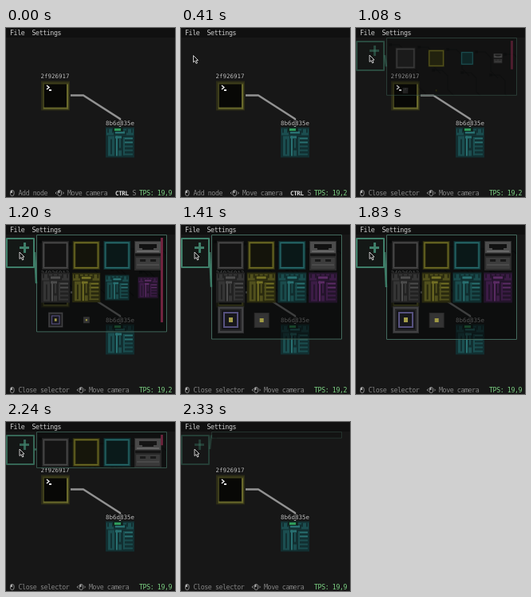
Animation, 212 px wide and 212 px high, one loop 2.41 s. Source, as an HTML page with a canvas:

```html
<!DOCTYPE html>
<html>
<head>
<meta charset="utf-8">
<style>
html, body { margin: 0; height: 100%; overflow: hidden; background: #171717; }
canvas { display: block; width: 100vw; height: 100vh; image-rendering: pixelated; }
</style>
</head>
<body>
<canvas id="stage" width="212" height="212"></canvas>
<script>
const g = document.getElementById('stage').getContext('2d');
const LOOP = 2410, OPEN = 1000, CLOSE = 2184;
const PANEL = { x: 38, y: 12, w: 164, h: 132 };
const MONO = '"DejaVu Sans Mono", "Liberation Mono", monospace';
const clamp = v => Math.max(0, Math.min(1, v));
const mix = (a, b, k) => a + (b - a) * k;

function rect(c, x, y, w, h) {
  g.fillStyle = c;
  g.fillRect(x, y, w, h);
}

function path(c, width, ...pts) {
  g.strokeStyle = c;
  g.lineWidth = width;
  g.beginPath();
  for (let i = 0; i < pts.length; i += 2) g.lineTo(pts[i], pts[i + 1]);
  g.stroke();
}

function text(s, x, y, c, size = 8.3, weight = '') {
  g.font = `${weight} ${size}px ${MONO}`;
  g.letterSpacing = '-.43px';
  g.fillStyle = c;
  g.fillText(s, x, y);
}

function label(s, x, y) {
  g.font = `7.5px ${MONO}`;
  g.letterSpacing = '0px';
  g.strokeStyle = '#111';
  g.lineWidth = 2;
  g.lineJoin = 'round';
  g.strokeText(s, x, y);
  g.fillStyle = '#c4c4c4';
  g.fillText(s, x, y);
}

// Parts are drawn around their own centre, about 36 px wide.
function screen([dark, mid, light]) {
  rect(dark, -18, -18, 36, 37);
  rect(mid, -16, -16, 33, 34);
  rect(light, 14, -14, 2, 31);
  rect(light, -15, 15, 31, 2);
  rect('#080806', -14, -14, 28, 29);
}

function frame([dark, mid, light, inner]) {
  rect(dark, -17, -18, 34, 36);
  rect(mid, -16, -17, 32, 34);
  rect(light, -15, -16, 30, 32);
  rect(dark, -14, -15, 28, 30);
  rect(inner, -13, -14, 26, 28);
}

function chip([dark, mid, light]) {
  rect(dark, -18, -19, 36, 38);
  rect(mid, -17, -17, 34, 8);
  for (let x = -16; x < 16; x += 6) rect(dark, x, -17, 2, 5);
  rect(dark, -8, -15, 16, 6);
  rect(light, -6, -14, 12, 3);
  rect(mid, -15, -8, 8, 25);
  rect(dark, -12, -4, 2, 19);
  rect(light, -6, -8, 8, 3);
  rect(light, -5, -8, 2, 25);
  rect(mid, -1, -5, 2, 12);
  for (let y = -6; y < 18; y += 5) rect(y < 4 ? light : mid, 4, y, 12, 2);
  rect(mid, 4, -6, 2, 22);
  rect(mid, -2, 10, 4, 7);
}

function printer() {
  rect('#2c2c2c', -17, -18, 34, 37);
  rect('#4d4d4d', -16, -17, 32, 14);
  rect('#111', -11, -14, 22, 5);
  rect('#111', -7, -10, 14, 3);
  rect('#676767', -14, -6, 28, 2);
  rect('#141414', -16, -2, 32, 3);
  rect('#3c3c3c', -15, 3, 30, 14);
  rect('#191919', -10, 5, 7, 3);
  rect('#191919', 3, 5, 7, 3);
  rect('#4b4b4b', -14, 11, 28, 2);
}

function core() {
  rect('#2b2b2d', -16, -17, 33, 34);
  rect('#414143', -15, -16, 31, 32);
  rect('#252527', -13, -14, 27, 28);
  rect('#151518', -11, -12, 23, 24);
  rect('#56517f', -9, -10, 19, 20);
  rect('#17171c', -7, -8, 15, 16);
  rect('#a49d49', -2, -3, 5, 6);
}

function button() {
  rect('#292929', -9, -9, 19, 19);
  rect('#343434', -8, -8, 17, 17);
  rect('#a09a45', -2, -2, 5, 5);
}

const grey = ['#222', '#353535', '#4c4c4c', '#131313'];
const olive = ['#29290f', '#51501d', '#737024', '#14140b'];
const teal = ['#102c2d', '#1a4b4c', '#297071', '#0a1818'];
const violet = ['#23142a', '#3c1c46', '#5b2b64', '#180d1c'];
const items = [
  () => frame(grey), () => frame(olive), () => frame(teal), printer,
  () => chip(grey), () => chip(olive), () => chip(teal), () => chip(violet),
  core, button
];

function place(draw, x, y, s = 1) {
  if (s <= 0) return;
  g.save();
  g.translate(x, y);
  g.scale(s, s);
  draw();
  g.restore();
}

function world() {
  path('#929292', 2.5, 81, 84.5, 97, 84.5, 143, 114, 143, 124);
  place(() => screen(['#2b2b16', '#3e3e1b', '#69692b']), 62, 84.5);
  path('#eee', 1.6, 51, 72, 54, 74.5, 51, 77);
  rect('#eee', 54, 77, 3, 2);
  place(() => chip(['#122f31', '#1b4e50', '#287071']), 143, 143.5);
  rect('#112420', 134, 124, 13, 6);
  rect('#2f9c5b', 136, 126, 8, 3);
  label('2f926917', 43.5, 62.5);
  label('8b6d835e', 125, 121.5);
}

function traces() {
  for (let i = 0; i < 9; i++) {
    const x = 42 + i * 18, y = 21 + (i * 29) % 55;
    path('#050808', 1.2, x, y, x + 12, y, x + 19, y + 7, x + 19, y + 24, x + 28, y + 33);
    rect('#050808', x - 1, y - 2, 4, 4);
  }
}

function selector(t) {
  const open = t < CLOSE
    ? 1 - Math.exp(-Math.max(0, t - 1028) / 66)
    : Math.exp(-(t - CLOSE) / 54);
  const fade = t < CLOSE ? clamp((t - OPEN) / 170) : 1 - clamp((t - 2190) / 220);
  if (!fade) return;
  const { x, y, w } = PANEL, h = PANEL.h * open;

  g.save();
  g.globalAlpha = fade;
  rect('rgba(7,9,9,.6)', x, y, w, h);
  g.save();
  g.beginPath();
  g.rect(x, y, w, h);
  g.clip();
  g.globalAlpha = fade * .6;
  traces();
  g.globalAlpha = Math.min(1, fade + .15);
  items.forEach((draw, i) => {
    const s = clamp((t - 984 - i * 18) / 130);
    const cy = 38 + Math.floor(i / 4) * 40.5;
    if (cy < y + h) place(draw, 62 + i % 4 * 38.7, cy, s);
  });
  if (open < .98) rect('#70243f', 194, y + 4, 3, Math.max(0, h - 8) * open);
  g.restore();

  g.globalAlpha = fade;
  g.strokeStyle = '#43695d';
  g.lineWidth = 1;
  g.strokeRect(x + .5, y + .5, w - 1, Math.max(0, h - 1));
  path('#3c7b66', 2.5, 36, 34, 38, y + h / 2);
  rect('rgba(19,24,22,.75)', 0, 16, 35, 37);
  g.strokeStyle = '#3f7f69';
  g.lineWidth = 2;
  g.strokeRect(1, 17, 34, 36);
  rect('#3f7f69', 17, 27, 12, 3);
  rect('#3f7f69', 22, 22, 3, 13);
  g.restore();
}

function mouse(x, arrows) {
  const c = '#aaa';
  g.strokeStyle = c;
  g.lineWidth = .8;
  g.beginPath();
  g.roundRect(x + .5, 203.5, 4.5, 7, 2.2);
  g.stroke();
  rect(c, x + 1, 204, 2, 3);
  if (arrows) {
    path(c, .8, x - 1, 205.5, x - 2.5, 207, x - 1, 208.5);
    path(c, .8, x + 6.5, 205.5, x + 8, 207, x + 6.5, 208.5);
  }
}

function bars(t) {
  rect('#101010', 0, 0, 212, 12);
  text('File', 5, 9, '#ccc');
  text('Settings', 32.5, 9, '#ccc');

  const picking = t >= OPEN, shift = picking ? 27 : 0, dim = '#858585';
  mouse(5);
  text(picking ? 'Close selector' : 'Add node', 15.5, 210, dim);
  mouse(64.5 + shift, true);
  text('Move camera', 77 + shift, 210, dim);
  if (!picking) {
    text('CTRL', 137, 209.5, '#ddd', 7.6, 'bold');
    text('S', 158.5, 210, dim);
  }
  text(t >= 370 && t < 1790 ? 'TPS: 19,2' : 'TPS: 19,9', 167, 210, '#7bcf82');
}

function pointer(t) {
  if (t < 200) return;
  const enter = clamp((t - 200) / 210), aim = clamp((t - 910) / 120);
  g.save();
  g.translate(mix(mix(11, 15.5, enter), 17, aim), mix(mix(31, 34.5, enter), 34, aim));
  g.beginPath();
  [[0, 0], [0, 8.5], [2, 6.7], [3.5, 10], [5, 9.3], [3.6, 6.2], [6, 6]]
    .forEach(p => g.lineTo(...p));
  g.closePath();
  g.fillStyle = '#111';
  g.fill();
  g.strokeStyle = '#ddd';
  g.lineWidth = .9;
  g.stroke();
  g.restore();
}

function draw(now) {
  const t = now % LOOP;
  rect('#171717', 0, 0, 212, 212);
  world();
  selector(t);
  bars(t);
  pointer(t);
  requestAnimationFrame(draw);
}
requestAnimationFrame(draw);
</script>
</body>
</html>
```
